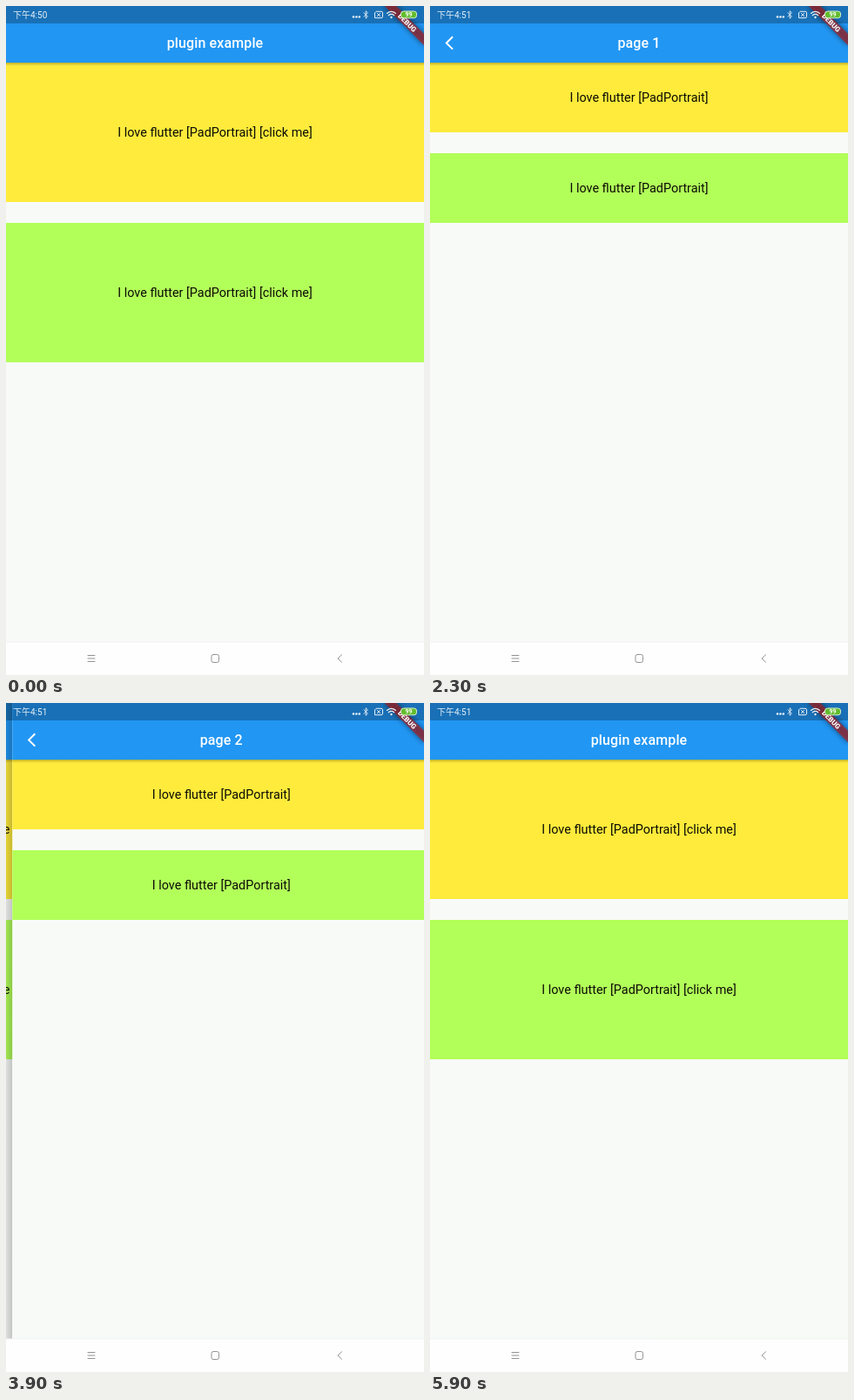
An HTML page for the animation above (6 s loop, 480x768 px).

```html
<!DOCTYPE html>
<html lang="en">
<head>
<meta charset="utf-8">
<title>Page transitions</title>
<style>
  html, body { margin: 0; width: 100%; height: 100%; overflow: hidden; background: #f8faf8; }
  svg { display: block; width: 480px; height: 768px; }
  text { font-family: Roboto, "Noto Sans CJK SC", "Noto Sans CJK", sans-serif; }
  .body { font-size: 14.4px; text-anchor: middle; fill: #0c0c06; }
  .title { font-size: 16px; font-weight: 500; letter-spacing: .12px; text-anchor: middle; fill: #fff; }
  .clock { font-size: 10px; fill: #e8f1f8; }
  .line { fill: none; stroke-linecap: round; stroke-linejoin: round; }
</style>
</head>
<body>
<svg viewBox="0 0 480 768">
  <defs>
    <linearGradient id="barShade" x2="0" y2="1">
      <stop offset="0" stop-opacity=".26"/>
      <stop offset=".5" stop-opacity=".11"/>
      <stop offset="1" stop-opacity="0"/>
    </linearGradient>
    <linearGradient id="edgeShade">
      <stop offset="0" stop-opacity="0"/>
      <stop offset=".3" stop-opacity=".016"/>
      <stop offset=".6" stop-opacity=".07"/>
      <stop offset="1" stop-opacity=".22"/>
    </linearGradient>
    <filter id="blur" x="-30%" y="-150%" width="160%" height="400%">
      <feGaussianBlur stdDeviation="3"/>
    </filter>
  </defs>

  <g id="home"></g>
  <g id="page"></g>

  <!-- debug banner -->
  <g transform="translate(480 0) rotate(45)">
    <rect x="-32" y="22.4" width="64" height="9.6" fill-opacity=".5" filter="url(#blur)"/>
    <rect x="-32" y="22.4" width="64" height="9.6" fill="#b71c1c" fill-opacity=".63"/>
    <text x="0" y="30.1" font-size="8.16" font-weight="900" text-anchor="middle" fill="#fff">DEBUG</text>
  </g>

  <!-- status bar -->
  <text id="clock" class="clock" x="8" y="14"></text>
  <g fill="#e8f1f8">
    <circle cx="399" cy="12.5" r="1.3"/>
    <circle cx="402.4" cy="12.5" r="1.3"/>
    <circle cx="405.8" cy="12.5" r="1.3"/>
    <circle cx="442.5" cy="13" r="1.2"/>
  </g>
  <g class="line" stroke="#e8f1f8">
    <path d="M411 7.7L415.4 12.2L413.2 14.3V5.7L415.4 7.8L411 12.3" stroke-width=".9"/>
    <path d="M425.5 6.3H431a1.5 1.5 0 0 1 1.5 1.5V12.200a1.500 1.500 0 0 1-1.500 1.500H423.500V8.300z" stroke-width="1"/>
    <path d="M426.400 8.500l3.200 3.200m0-3.200l-3.200 3.200" stroke-width="1"/>
    <path d="M437.500 8.400q5-4 10 0M439.300 10.700q3.200-2.500 6.400 0" stroke-width="1.300"/>
  </g>
  <rect x="453.500" y="6" width="18" height="7.800" rx="3" fill="#62bd2c" stroke="#d9efcf" stroke-width="1"/>
  <text x="462.500" y="12.400" font-size="7" font-weight="700" text-anchor="middle" fill="#fff">99</text>

  <!-- navigation bar -->
  <rect y="730" width="480" height="38" fill="#fefefe"/>
  <rect y="729.500" width="480" height="1" fill="#f1f3f2"/>
  <g class="line" stroke="#939393" stroke-width="1">
    <path d="M94 745.500h8M94 749h8M94 752.500h8"/>
    <rect x="236" y="744.500" width="8.500" height="9" rx="2"/>
    <path d="M385.500 744.800L381 749l4.500 4.200"/>
  </g>
</svg>
<script>
const LOOP = 6000, STEP = 100, WIDTH = 480, MOVE = 400;
const $ = id => document.getElementById(id);
const home = $('home'), page = $('page'), clock = $('clock');

const rect = (y, h, fill) => `<rect y="${y}" width="${WIDTH}" height="${h}" fill="${fill}"/>`;
const label = (cls, y, s, id = '') => `<text class="${cls}" id="${id}" x="240" y="${y}">${s}</text>`;

function screen(title, titleId, boxH, text) {
  const second = 65 + boxH + 24;
  const baseline = top => top + boxH / 2 + 4.8;
  return rect(0, 730, '#f8faf8')
    + rect(65, boxH, '#feeb3b') + rect(second, boxH, '#b2ff59')
    + label('body', baseline(65), text) + label('body', baseline(second), text)
    + rect(65, 4, 'url(#barShade)')
    + rect(0, 65, '#2196f3') + rect(0, 20, '#1970b6')
    + label('title', 48, title, titleId);
}

home.innerHTML = screen('plugin example', 'homeTitle', 160, 'I love flutter [PadPortrait] [click me]');
page.innerHTML = '<rect id="edge" x="-24" width="24" height="730" fill="url(#edgeShade)"/>'
  + screen('', 'pageTitle', 80, 'I love flutter [PadPortrait]')
  + '<path fill="#fff" transform="translate(12.8 32.8) scale(.8)" '
  + 'd="M17.5 3.900L15.700 2.100 5.800 12l9.900 9.900 1.800-1.800L9.400 12z"/>';
const edge = $('edge'), pageTitle = $('pageTitle');

// cubic-bezier(.35, .91, .33, .97)
function ease(x) {
  if (x <= 0) return 0;
  if (x >= 1) return 1;
  const curve = (s, a, b) => 3 * (1 - s) ** 2 * s * a + 3 * (1 - s) * s * s * b + s ** 3;
  let lo = 0, hi = 1;
  for (let i = 0; i < 24; i++) {
    const mid = (lo + hi) / 2;
    if (curve(mid, .35, .33) < x) lo = mid; else hi = mid;
  }
  return curve(lo, .91, .97);
}

// visible from, motion start, opening
const moves = [
  [0, 1850, true],
  [2600, 2850, false],
  [3900, 3592, true],
  [4800, 5000, false]
];

function draw(t) {
  const [, start, opening] = moves.filter(m => t >= m[0]).pop();
  const e = ease((t - start) / MOVE);
  const open = opening ? e : 1 - e;
  home.setAttribute('transform', `translate(${-WIDTH / 3 * open} 0)`);
  page.setAttribute('transform', `translate(${WIDTH * (1 - open)} 0)`);
  page.setAttribute('visibility', open > 0 ? 'visible' : 'hidden');
  edge.setAttribute('opacity', open);
  pageTitle.textContent = t < 3600 ? 'page 1' : 'page 2';
  clock.textContent = t < 2000 ? '下午4:50' : '下午4:51';
}

const began = performance.now();
function tick() {
  const t = (performance.now() - began) % LOOP;
  draw(Math.floor(t / STEP) * STEP);
  requestAnimationFrame(tick);
}
tick();
</script>
</body>
</html>
```
